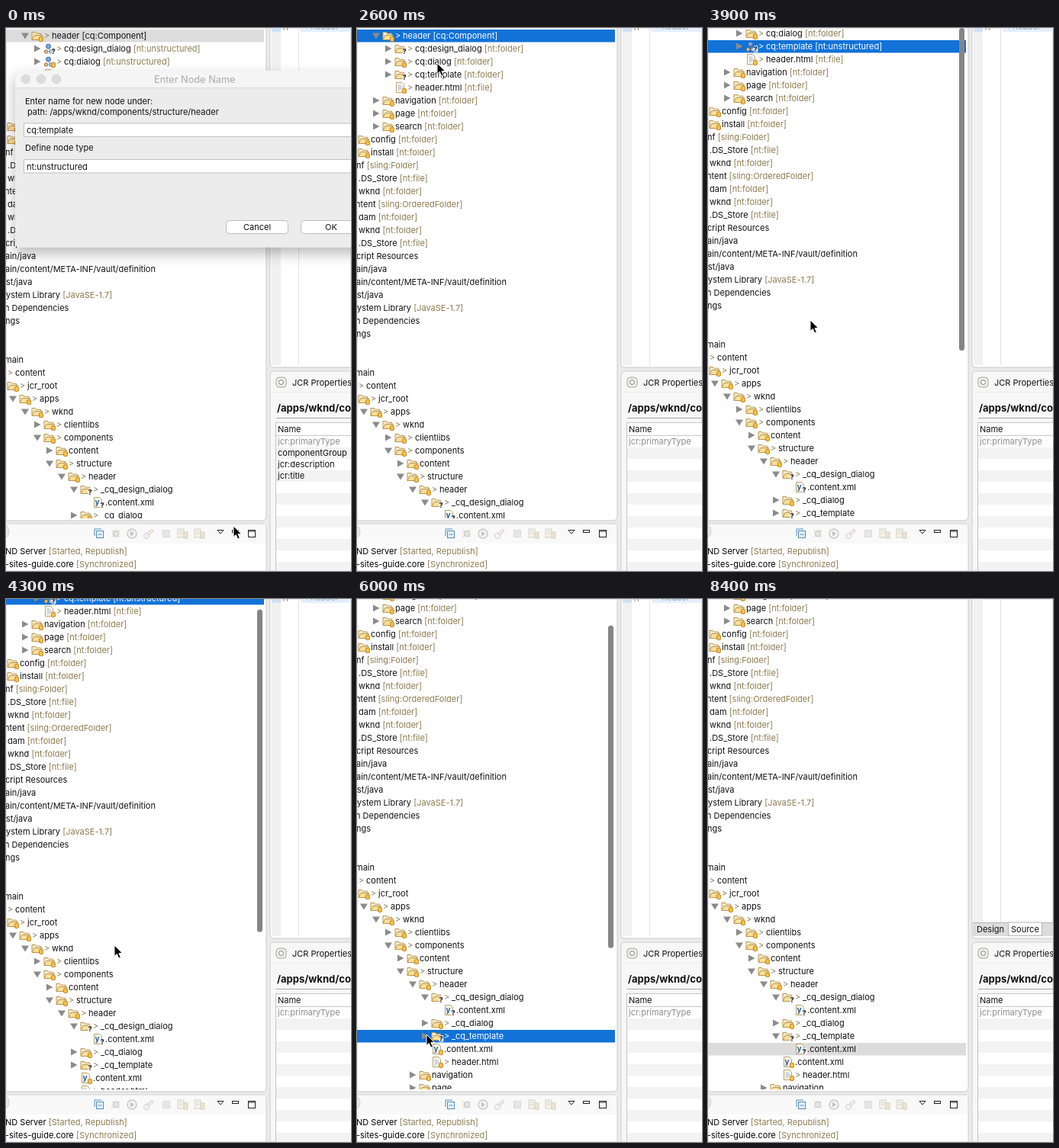
An HTML page for the animation above (8.5 s loop, 452x712 px).

```html
<!DOCTYPE html>
<html lang="en">
<head>
<meta charset="utf-8">
<title>Adding a template node</title>
<style>
html, body { margin: 0; width: 100%; height: 100%; overflow: hidden; background: #ebebeb; }
svg { display: block; font: 11px Inter, "Noto Sans", sans-serif; }
</style>
</head>
<body>
<svg id="stage" width="452" height="712" viewBox="0 0 452 712"></svg>
<script>
const LOOP = 8500, STEP = 100, ROW = 17;
const TAN = '#8d7b50', BLUE = '#1272d8', GRAY = '#dcdcdc';
const REFRESHED = 1700, TEMPLATE_PICKED = 3200, LOWER_PICKED = 5700, EXPANDED = 6400,
      FILE_PICKED = 7100, FILE_OPEN = 7600;

// Keyframes: time followed by values
const cursorKeys = [[0, 298, 653], [100, 298, 653], [1000, 416, 257], [1500, 416, 257], [2500, 105, 46],
  [2700, 105, 46], [3000, 106, 60], [3300, 106, 60], [3800, 134, 383], [3900, 134, 383], [4300, 142, 454],
  [4900, 142, 470], [5500, 91, 571], [6400, 91, 571], [6900, 138, 588], [7500, 138, 588], [8100, 480, 470]];
const scrollKeys = [[3500, 0], [3900, 37], [4300, 62], [5000, 100]];
const clicks = [[1100, 1300], [3100, 3300], [5600, 5800], [6300, 6500], [7000, 7200], [7300, 7400]];

function tween(keys, t) {
  const next = keys.findIndex(k => k[0] > t);
  if (next === 0) return keys[0].slice(1);
  if (next < 0) return keys[keys.length - 1].slice(1);
  const a = keys[next - 1], b = keys[next], p = (t - a[0]) / (b[0] - a[0]);
  const ease = p * p * (3 - 2 * p);
  return a.slice(1).map((v, i) => v + (b[i + 1] - v) * ease);
}

const esc = s => s.replace(/&/g, '&amp;').replace(/</g, '&lt;').replace(/>/g, '&gt;');
const rect = (x, y, w, h, fill, more = '') =>
  `<rect x="${x}" y="${y}" width="${w}" height="${h}" fill="${fill}" ${more}/>`;
const path = (d, fill, stroke = 'none', more = '') => `<path d="${d}" fill="${fill}" stroke="${stroke}" ${more}/>`;
const circle = (x, y, r, fill, stroke = 'none', more = '') =>
  `<circle cx="${x}" cy="${y}" r="${r}" fill="${fill}" stroke="${stroke}" ${more}/>`;
const label = (x, y, s, fill = '#111', more = '') => `<text x="${x}" y="${y + 4}" fill="${fill}" ${more}>${esc(s)}</text>`;
const group = (x, y, body) => `<g transform="translate(${x} ${y})">${body}</g>`;

// Icons, centred on the origin
const database = path('M3 2q2.5-1.6 5 0v5q-2.5 1.6-5 0z', '#f6bf45', '#b47a22', 'stroke-width=".8"');
const question = rect(3, -1, 6, 9, '#fff', 'rx="2" opacity=".8"') +
  label(3, 3, '?', '#222', 'font-size="9" font-weight="800"');
const folder = path('M-6.5 5V-4.5h4.5l1.2 1.7h6v2.3', '#f8edcc', '#b9934d') +
  path('M-6.5 5.5l3-6h10.5l-2.7 6z', '#fbe09a', '#b9934d');
const node = path('M-2-1l4 4', 'none', '#8298b0') + circle(-1, -3, 3, '#7fa8dc', '#40699c') +
  circle(-4, 4, 2.2, '#e2c289', '#9a7640') + circle(2, 4, 2.2, '#b8c8de', '#66809f');
const page = path('M-5-6.5H2l3 3v10H-5z', '#fdfaf0', '#b9a06b');
const textPage = page + path('M-3-3h4M-3-1h6M-3 1h6M-3 3h4', 'none', '#8fa5bd', 'stroke-width=".8"') + database;
const xmlPage = page + label(-4, -1, 'y', '#245f9c', 'font-size="10" font-weight="700"');
const icons = {
  f: folder + database, q: folder + question, n: node + database, m: node + question,
  t: textPage, x: xmlPage + database, y: xmlPage + question, '-': ''
};
const arrows = {
  '+': path('M-4-4.5L4.5 0L-4 4.5z', '#8b8b8b'),
  v: path('M-5-3.5H5L0 4.5z', '#8b8b8b'), '-': ''
};

// Rows: left edge of the label, icon, arrow, label, type
function treeRows(t) {
  const fresh = t >= REFRESHED, kind = fresh ? '[nt:folder]' : '[nt:unstructured]';
  const picked = t >= TEMPLATE_PICKED;
  return `50|f|v|>header|[cq:Component]
66|${fresh ? 'q' : 'm'}|+|>cq:design_dialog|${kind}
66|${fresh ? 'f' : 'n'}|+|>cq:dialog|${kind}
${fresh ? `66|${picked ? 'm' : 'q'}|+|>cq:template|${picked ? '[nt:unstructured]' : kind}\n` : ''}66|t|-|>header.html|[nt:file]
50|f|+|navigation|[nt:folder]
50|f|+|page|[nt:folder]
50|f|+|search|[nt:folder]
18|f|-|config|[nt:folder]
18|f|-|install|[nt:folder]
-1|-|-|nf|[sling:Folder]
2|-|-|.DS_Store|[nt:file]
2|-|-|wknd|[nt:folder]
-2|-|-|ntent|[sling:OrderedFolder]
2|-|-|dam|[nt:folder]
2|-|-|wknd|[nt:folder]
2|-|-|.DS_Store|[nt:file]
-1|-|-|cript Resources
-1|-|-|ain/java
-1|-|-|ain/content/META-INF/vault/definition
0|-|-|st/java
0|-|-|ystem Library|[JavaSE-1.7]
-2|-|-|n Dependencies
-1|-|-|ngs
0|-|-|
0|-|-|
-2|-|-|main
2|-|-|>content
18|f|-|>jcr_root
34|f|v|>apps
50|f|v|>wknd
66|f|+|>clientlibs
66|f|v|>components
82|f|+|content
82|f|v|>structure
98|f|v|>header
114|q|v|>_cq_design_dialog
130|y|-|.content.xml
114|f|+|>_cq_dialog
${fresh ? `114|q|${t >= EXPANDED ? 'v' : '+'}|>_cq_template\n` : ''}${t >= EXPANDED ? '130|y|-|.content.xml\n' : ''}114|x|-|.content.xml
114|t|-|>header.html
98|f|+|navigation
98|f|+|page`.split('\n').map(r => r.split('|'));
}

function selectedRow(t) {
  if (t >= FILE_PICKED) return 40;
  if (t >= LOWER_PICKED) return 39;
  return t >= TEMPLATE_PICKED ? 3 : 0;
}

function drawTree(t) {
  const scroll = tween(scrollKeys, t)[0], selected = selectedRow(t);
  const dim = t < 1500 || t >= FILE_OPEN;
  let out = path('M0 0H341V640q0 6-6 6H0z', '#fff', '#c9c9c9') + '<g clip-path="url(#treeClip)">';
  treeRows(t).forEach(([left, icon, arrow, name, type = ''], i) => {
    const x = +left, y = 10 + i * ROW - Math.round(scroll);
    if (y < -12 || y > 655) return;
    const on = i === selected, white = on && !dim, marked = name[0] === '>';
    if (on) out += rect(0, y - 8, 338, 16.5, dim ? GRAY : BLUE);
    out += group(x - 25, y, arrows[arrow]) + group(x - 9.5, y, icons[icon]);
    if (marked) out += label(x, y, '>', white ? '#fff' : TAN);
    out += `<text x="${x + (marked ? 10 : 0)}" y="${y + 4}" fill="${white ? '#fff' : '#111'}">${esc(marked ? name.slice(1) : name)}` +
      `<tspan fill="${white ? '#fff' : on ? '#111' : TAN}"> ${type}</tspan></text>`;
  });
  if (t >= 3500 && t < 6500)
    out += rect(329, (scroll - 37) * .55, 7, 423, '#858585', `rx="3.5" opacity="${t < 6300 ? 1 : .5}"`);
  return out + '</g>';
}

function drawServers(cursorOverMinimise) {
  const faint = '#d4d0c8', ink = '#222';
  return path('M0 650H335q6 0 6 6V712H0z', '#fff', '#cfcfcf') + rect(0, 651, 340, 25, '#f9f9f9') +
    path('M0 652q4 2 4 8t-4 8', '#e8e8e8', '#cfcfcf') +
    rect(118.5, 659.5, 9, 9, '#e9f3fc', 'stroke="#4f8cba"') + path('M116 666V657H125M120.5 664h5', 'none', '#4f8cba') +
    circle(144, 663, 3.5, 'none', faint, 'stroke-width="2"') + path('M138 658l11 10M149 658l-11 10', 'none', faint) +
    circle(165, 663, 6, '#f4f4f4', '#c9c9c9', 'stroke-width="1.5"') + path('M163 659.5l5 3.5-5 3.5z', '#c4c4c4') +
    circle(184, 666, 3.5, '#f4f4f4', faint) + path('M185 662l6-5 2 3-6 5z', '#f1eee8', faint) +
    rect(205.5, 658.5, 9, 9, '#e6e6e6', 'stroke="#dadada"') +
    [231, 253].map(x => rect(x - 6, 657, 8, 11, '#f6f3ec', `stroke="${faint}"`) +
      path(`M${x - 4} 660h4M${x - 4} 663h4`, 'none', faint) + rect(x + 2, 661, 5, 8, '#efe4cd', `stroke="${faint}"`)).join('') +
    path('M277 658.5h8l-4 4.5z', '#fff', ink) + rect(296.5, 658.5, 8, 3, '#fff', `stroke="${ink}"`) +
    rect(317.5, 658.5, 9, 9, '#fff', `stroke="${ink}"`) + path('M317 660h10', 'none', ink) +
    `<text x="-1" y="690">ND Server <tspan fill="${TAN}">[Started, Republish]</tspan></text>` +
    `<text x="-1" y="707">-sites-guide.core <tspan fill="${TAN}">[Synchronized]</tspan></text>`;
}

function drawEditor(t) {
  let out = path('M346 0H452V445H351q-5 0-5-5z', '#fff', '#c9c9c9') + rect(348, 0, 12, 442, '#f1f1f1') +
    path('M383.5 0V442', 'none', '#e2e2e2');
  if (t < FILE_OPEN)
    return out + rect(348, 0, 12, 5, '#cfe0f3') + rect(386, 0, 66, 5, '#e4effb') +
      label(361, -1, '11', '#8a8a8a') + label(389, -2, '< header', '#8aa5b5');
  return out + rect(347, 424, 105, 18, '#dcdcdc') + path('M347 424.5H452', 'none', '#b5b5b5') +
    rect(393.5, 424, 44, 17.5, '#fff', 'stroke="#b5b5b5"') + label(352, 433, 'Design') + label(397, 433, 'Source');
}

function drawProperties(t) {
  let out = path('M452 450H352q-6 0-6 6V712H452z', '#f7f7f7', '#cfcfcf') + rect(347, 477, 105, 1, '#ececec') +
    rect(354, 458, 13, 13, '#f0f0ea', 'rx="4" stroke="#a5a59b"') + circle(360.5, 464.5, 3, '#fff', '#777') +
    label(375, 465, 'JCR Properties') +
    label(355, 499, '/apps/wknd/components', '#111', 'font-size="13" font-weight="700"') +
    path('M354 511.5H452', 'none', '#a8a8a8') +
    rect(353.5, 517.5, 110, 200, '#fff', 'stroke="#c4c4c4"') + path('M354 534.5H452', 'none', '#c8c8c8') +
    label(356, 526, 'Name');
  for (let y = 550; y < 712; y += 30) out += rect(354, y, 98, 15, '#f3f3f3');
  const names = ['jcr:primaryType', 'componentGroup', 'jcr:description', 'jcr:title'];
  names.slice(0, t < REFRESHED ? 4 : 1).forEach((n, i) => out += label(356, 542 + i * 15, n, i ? '#111' : '#8c8c8c'));
  return out;
}

function drawDialog(t) {
  const active = t >= 300;
  const light = (x, fill, edge) => circle(x, 67, 5.7, fill, edge, 'stroke-width=".7"');
  const button = (x, w, fill) => rect(x, 252.5, w, 17, fill, 'rx="4" stroke="#bdbdbd"');
  const field = y => rect(23.5, y, 450, 17.5, '#fff', 'stroke="#c0c0c0"');
  return `<g filter="url(#${active ? 'deep' : 'soft'})">` + rect(12, 56, 470, 231.5, '#ececec', 'rx="5"') + '</g>' +
    path('M12 78V61q0-5 5-5H452V78z', active ? 'url(#bar)' : '#f5f5f5') +
    path('M12 78.5H452', 'none', active ? '#b9b9b9' : '#dcdcdc') +
    light(26, active ? '#fc5753' : '#dcdcdc', active ? '#df4744' : '#cfcfcf') +
    light(46, '#dcdcdc', '#cbcbcb') + light(66, '#dcdcdc', '#cbcbcb') +
    label(194, 67.5, 'Enter Node Name', active ? '#444' : '#aaa', 'font-size="12.75"') +
    label(25, 96, 'Enter name for new node under:') + label(28, 110, 'path: /apps/wknd/components/structure/header') +
    (active ? rect(22.5, 124.5, 450, 19, '#fff', 'rx="1" stroke="#83b4ec" stroke-width="3"') : field(125)) +
    label(27, 134, 'cq:template') + (active ? rect(89.5, 127, 1, 14, '#111') : '') +
    label(25, 157, 'Define node type') + field(172.5) + label(27, 182, 'nt:unstructured') +
    button(288.5, 81, '#fff') + label(311, 261, 'Cancel') +
    button(386.5, 90, active ? 'url(#ok)' : '#fff') + label(418, 261, 'OK', active ? '#d5e6fd' : '#111');
}

function drawCursor(t) {
  const [x, y] = tween(cursorKeys, t);
  const ring = clicks.some(([from, to]) => t >= from && t <= to);
  return (ring ? circle(x, y + 1, 20, 'none', '#0b0b0b', 'stroke-width="3"') : '') +
    group(x, y, path('M0 0V14.5L3.3 11.4 5.7 17 8.3 15.9 5.9 10.5H10.5Z', '#000', '#fff', 'stroke-width="1"'));
}

const shadow = (id, dy, blur, alpha) => `<filter id="${id}" x="-20%" y="-30%" width="140%" height="170%">
  <feDropShadow dx="0" dy="${dy}" stdDeviation="${blur}" flood-opacity="${alpha}"/></filter>`;
const gradient = (id, top, bottom) => `<linearGradient id="${id}" x2="0" y2="1">
  <stop stop-color="${top}"/><stop offset="1" stop-color="${bottom}"/></linearGradient>`;
const defs = `<defs>${shadow('soft', 8, 9, .28)}${shadow('deep', 16, 17, .45)}
  ${gradient('bar', '#e9e9e9', '#d2d2d2')}${gradient('ok', '#4c9cf7', '#0b60e2')}
  <clipPath id="treeClip"><rect width="340" height="643"/></clipPath></defs>`;

const stage = document.getElementById('stage');
let shown = -1;
function frame(now) {
  const t = Math.floor(now % LOOP / STEP) * STEP;
  if (t !== shown) {
    shown = t;
    stage.innerHTML = defs + rect(0, 0, 452, 712, '#ebebeb') + drawTree(t) + drawServers() + drawEditor(t) +
      drawProperties(t) + (t < 1500 ? drawDialog(t) : '') + drawCursor(t);
  }
  requestAnimationFrame(() => frame(performance.now()));
}
frame(0);
</script>
</body>
</html>
```
